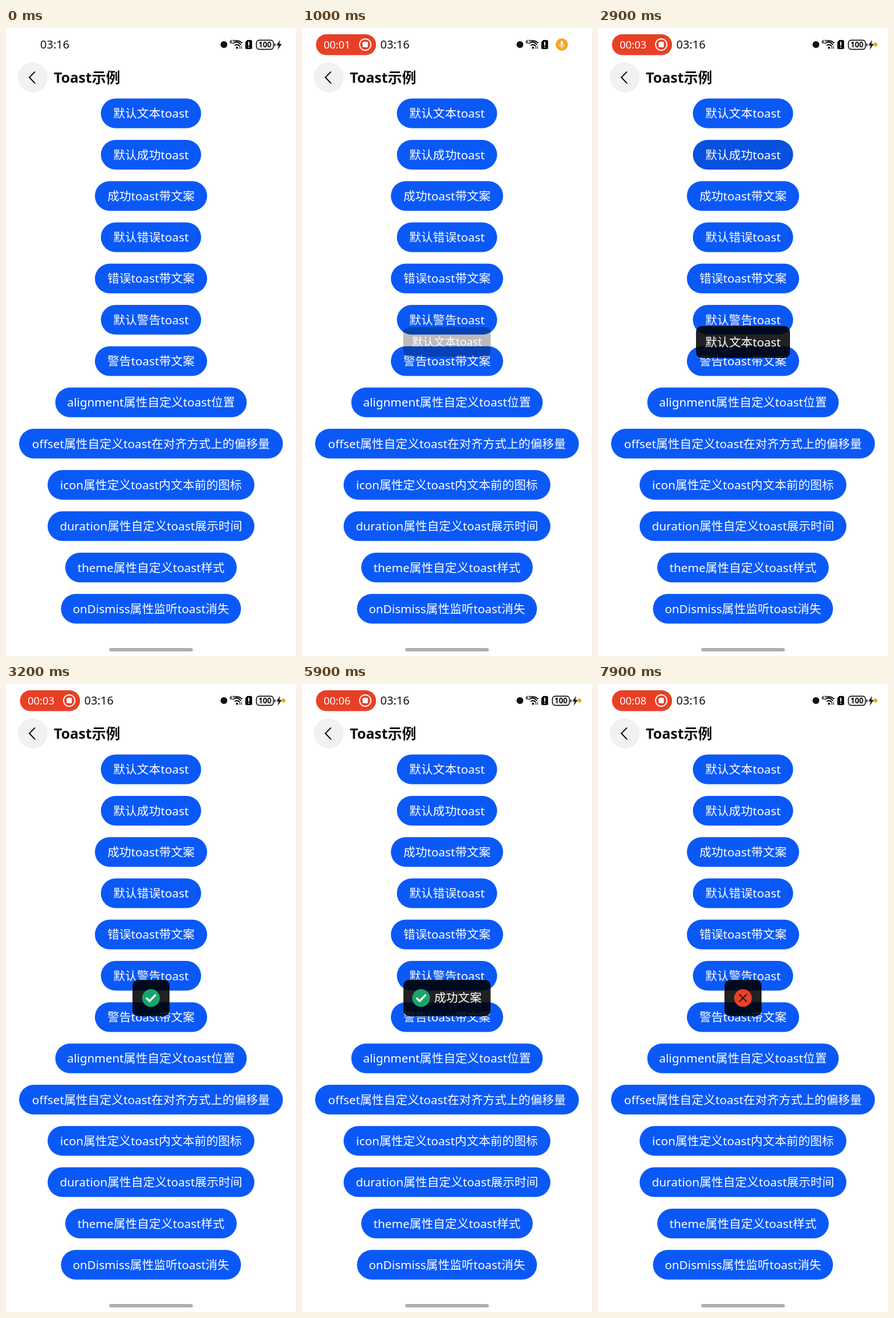
These frames come from a looping animation (509 px wide and 1100 px high, 8000 ms). An HTML page:

```html
<!DOCTYPE html>
<html lang="zh-CN">
<head>
<meta charset="utf-8">
<title>Toast示例</title>
<style>
  html, body { margin: 0; width: 100%; height: 100%; overflow: hidden; background: #fff; }
  svg { display: block; width: 509px; height: 1100px; }
  text { font: 500 20.8px "Noto Sans", "Noto Sans CJK SC", "Noto Sans CJK", sans-serif; fill: #fff; }
  .mid { text-anchor: middle; }
  .ink { fill: #111; }
  .line { fill: none; stroke: #111; stroke-linecap: round; stroke-linejoin: round; }
  .white { stroke: #fff; }
</style>
</head>
<body>
<svg viewBox="0 0 509 1100">
  <text id="clock" class="ink" y="36" style="font-size:20px">03:16</text>

  <g id="recorder">
    <rect x="24.5" y="11" width="105.5" height="36.5" rx="18.25" fill="#e84026"/>
    <text id="timer" x="38" y="35.5" style="font-size:18.4px"></text>
    <circle class="line white" cx="111" cy="29" r="10" stroke-width="1.8"/>
    <rect x="106.3" y="24.3" width="9.4" height="9.4" rx="2" fill="#fff"/>
  </g>

  <circle class="ink" cx="382.5" cy="29" r="6"/>
  <text class="ink" x="392.5" y="27" style="font-size:8.5px;font-weight:700">6</text>
  <path class="line" stroke-width="1" d="M398 22h3M399.5 20.5v3"/>
  <path class="line" stroke-width="2" d="M402 22.5Q409 21 414 26M398.5 27Q406 21.500 412 29M401.500 30.500Q406 27.500 409.500 31"/>
  <circle class="ink" cx="405.500" cy="34.500" r="2"/>
  <path class="line" stroke-width="1.2" d="M410.500 36v-4M413.500 32v4"/>
  <path class="ink" d="M423.500 21h6a2.500 2.500 0 0 1 2.500 2.500v11a2.500 2.500 0 0 1-2.500 2.500h-7a2.500 2.500 0 0 1-2.500-2.500v-10z"/>
  <path class="line white" stroke-width="2" d="M426 25v5M426 33.500v.1"/>

  <g id="battery">
    <rect class="line" x="439.500" y="21.300" width="30" height="16" rx="5" stroke-width="1.700"/>
    <text class="ink mid" x="454.500" y="34.300" style="font-size:13.500px;font-weight:700">100</text>
    <rect class="ink" x="471" y="27" width="1.700" height="5" rx=".8"/>
    <path class="ink" d="M481 21L474.500 30.500H478.500L477 38L484 28H479.800Z"/>
  </g>
  <g id="mic">
    <circle r="10.700" fill="#f8a51f"/>
    <g id="micIcon">
      <rect x="-2.200" y="-6.200" width="4.400" height="8" rx="2.200" fill="#fff"/>
      <path class="line white" stroke-width="1.200" d="M-4.300-.5a4.300 4.300 0 0 0 8.600 0M0 4v2.300"/>
    </g>
  </g>

  <circle cx="47" cy="86.500" r="26.200" fill="#f1f1f1"/>
  <path class="line" stroke-width="2" d="M50.500 77L41 86.500L50.500 96.500"/>
  <text class="ink" x="84" y="95.500" style="font-size:25px;font-weight:700">Toast示例</text>

  <g id="buttons"></g>
  <circle id="touch" cx="295" cy="361" r="13" fill="#fff" opacity=".6"/>
  <g id="toasts"></g>
  <rect x="181" y="1086" width="147" height="6" rx="3" fill="#b0b0b0"/>
</svg>

<script>
const CX = 254.5, TOAST_Y = 550, LOOP = 8000, STEP = 100;
const $ = id => document.getElementById(id);
const clamp = x => Math.max(0, Math.min(1, x));
const ease = x => (x = clamp(x), x * x * (3 - 2 * x));
const ramp = (t, from, to) => ease((t - from) / (to - from));

const labels = [
  ['默认文本toast', 176], ['默认成功toast', 176], ['成功toast带文案', 197],
  ['默认错误toast', 176], ['错误toast带文案', 197], ['默认警告toast', 176],
  ['警告toast带文案', 197], ['alignment属性自定义toast位置', 336],
  ['offset属性自定义toast在对齐方式上的偏移量', 463],
  ['icon属性定义toast内文本前的图标', 363], ['duration属性自定义toast展示时间', 363],
  ['theme属性自定义toast样式', 301], ['onDismiss属性监听toast消失', 316]
];
const presses = [850, 2900, 4900, 6970];

$('buttons').innerHTML = labels.map(([label, w], i) => {
  const y = 149.6 + i * 72.3;
  const box = `x="${CX - w / 2}" y="${y - 26}" width="${w}" height="52" rx="26"`;
  const shade = i < presses.length ? `<rect class="shade" ${box}/>` : '';
  return `<rect ${box} fill="#0a59f7"/>${shade}<text class="mid" x="${CX}" y="${y + 7.6}">${label}</text>`;
}).join('');
const shades = document.querySelectorAll('.shade');

const disc = (x, color, mark) =>
  `<g transform="translate(${x})"><circle r="15.5" fill="${color}"/>${mark}</g>`;
const check = x => disc(x, '#16a669', '<path class="line white" stroke-width="3.4" d="M-7.500 .5L-2.500 5.500L7.500-5"/>');
const cross = disc(0, '#e84026', '<path class="line" stroke-width="1.800" d="M-6-6L6 6M6-6L-6 6"/>');

const toasts = [
  { start: 890, w: 165, h: 56, body: '<text class="mid" y="7.500">默认文本toast</text>' },
  { start: 2890, w: 65, h: 64, body: check(0) },
  { start: 4890, w: 153, h: 64, body: check(-45.500) + '<text x="-22.500" y="7">成功文案</text>' },
  { start: 6890, w: 65, h: 64, body: cross }
];
$('toasts').innerHTML = toasts.map(({ w, h, body }) =>
  `<g><rect x="${-w / 2}" y="${-h / 2}" width="${w}" height="${h}" rx="10" opacity=".87"/>${body}</g>`).join('');
const toastNodes = [...$('toasts').children];

const move = (node, x, y, scale = 1) =>
  node.setAttribute('transform', `translate(${x} ${y}) scale(${scale})`);
const fade = (node, alpha) => node.setAttribute('opacity', alpha);

function draw(t) {
  // Status bar: the recorder pill opens, then the microphone chip shrinks to a dot.
  const open = ramp(t, 100, 500);
  $('clock').setAttribute('x', 60 + 77.5 * open);
  fade($('recorder'), open);
  move($('recorder'), 24 * (1 - open), 29 * (1 - open), open);
  $('timer').textContent = '00:0' + Math.floor((t + 100) / 1000);

  const chip = ramp(t, 300, 600), dot = ramp(t, 1400, 1800);
  move($('mic'), 456 + 31 * dot, 29, chip * (1 - 0.68 * dot));
  fade($('micIcon'), 1 - dot);
  fade($('battery'), 1 - chip + dot);

  shades.forEach((node, i) => fade(node, 0.1 * clamp(1 - Math.abs(t - presses[i]) / 100)));
  fade($('touch'), t >= 6900 && t < 7000 ? 0.6 : 0);

  toasts.forEach(({ start }, i) => {
    const shown = ramp(t, start, start + 300);
    const next = toasts[i + 1];
    const gone = next ? ramp(t, next.start, next.start + 300) : 0;
    fade(toastNodes[i], shown * (1 - gone));
    move(toastNodes[i], CX, TOAST_Y, 0.9 + 0.1 * shown);
  });
}

const begin = performance.now();
function tick() {
  const t = (performance.now() - begin) % LOOP;
  draw(Math.floor(t / STEP) * STEP);
  requestAnimationFrame(tick);
}
tick();
</script>
</body>
</html>
```
